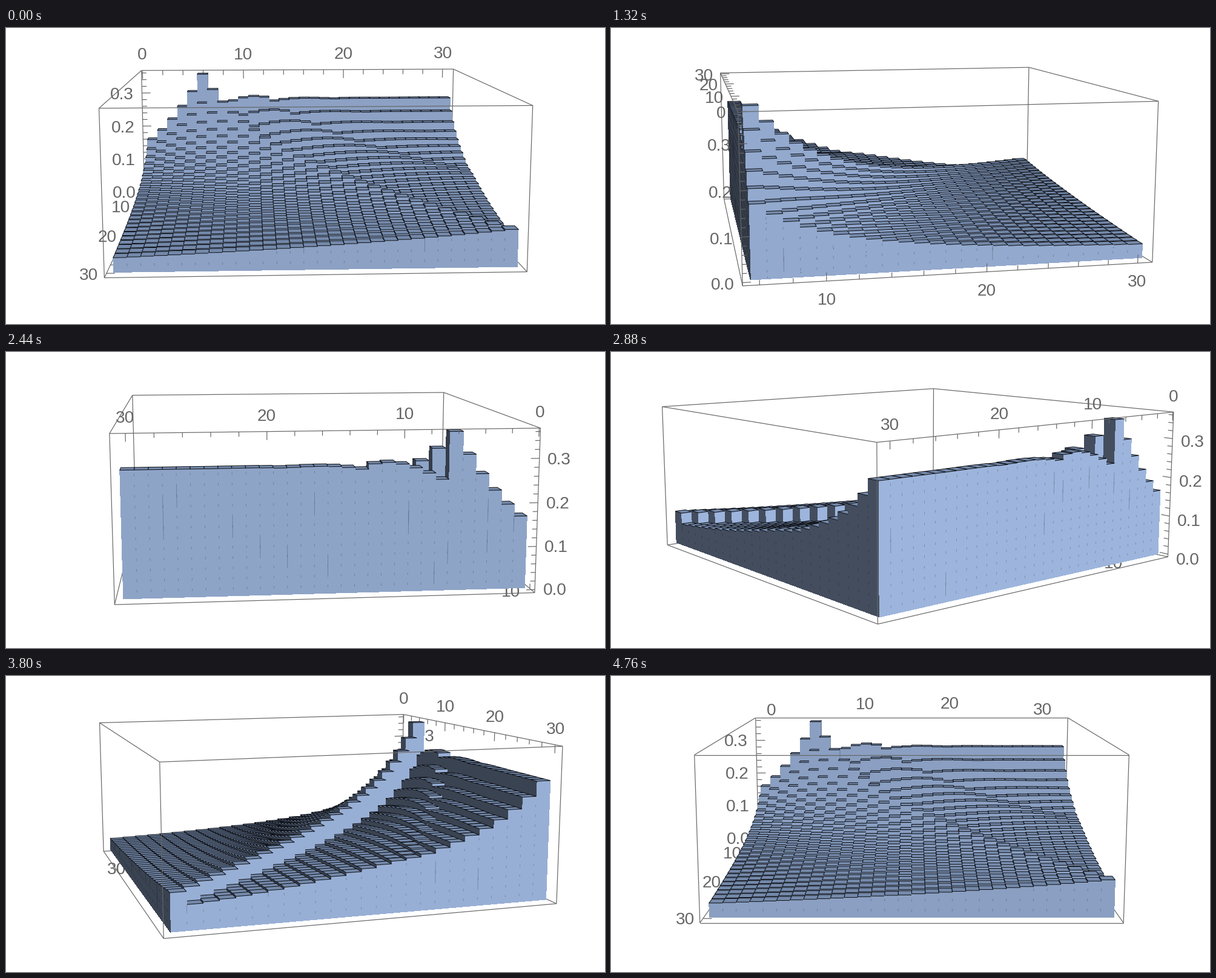
Animation of 989 by 490 pixels, one loop 4800 ms. Source, as a matplotlib script:

```python
from itertools import product

import matplotlib.pyplot as plt
import numpy as np
from matplotlib.animation import FuncAnimation
from matplotlib.collections import LineCollection, PolyCollection

W, H, DPI = 989, 490, 100
FRAMES, INTERVAL = 120, 40
PX = 72 / DPI
GREY = "#666666"

# Camera: the box spans +-1, +-1, +-0.4 and turns under a fixed eye.
DIST, FOCAL = np.sqrt(37), 1805
SIN, COS = 1 / np.sqrt(37), 6 / np.sqrt(37)
CX, CY = 496.5, 213.2
HALF = np.array([1, 1, 0.4])

# Brightness of an upright face by its angle to the viewer.
ANGLES = [-78, -72, -51, -36, -30, 0, 3, 12, 18, 39, 54, 60, 90]
BRIGHT = [53, 58, 67, 80, 92, 138, 140, 147, 152, 157, 151, 146, 120]
TOP = (116 / 255, 137 / 255, 170 / 255, 1)
EDGE = (0.05, 0.06, 0.08, 1)

SUMS = np.arange(1, 31)
SIDES = np.arange(6, 31)


def hit_chance(sides):
    """Chance that the running total of a fair die ever equals 1..30."""
    u = [1.0]
    for _ in SUMS:
        u.append(sum(u[-sides:]) / sides)
    return u[1:]


heights = np.array([hit_chance(s) for s in SIDES])
PEAK = heights.max()


def sx(v):
    return (v - 15.5) / 15.6


def sy(v):
    return (v - 18) / 13


def sz(v):
    return (v - PEAK / 2) * 0.4 / (0.52 * PEAK)


bar_x, bar_y = (g.ravel() for g in np.meshgrid(sx(SUMS), sy(SIDES)))
bar_z = sz(heights).ravel()
FLOOR = sz(0)
HX, HY = 0.5 / 15.6, 0.5 / 13


def project(p, th):
    p = np.asarray(p, float)
    x, y, z = p[..., 0], p[..., 1], p[..., 2]
    right = x * np.cos(th) + y * np.sin(th)
    near = y * np.cos(th) - x * np.sin(th)
    scale = FOCAL / (DIST - near * COS - z * SIN)
    return np.stack([CX + scale * right,
                     CY - scale * (z * COS - near * SIN)], axis=-1)


def shade(normal_x, normal_y, th):
    right = normal_x * np.cos(th) + normal_y * np.sin(th)
    near = normal_y * np.cos(th) - normal_x * np.sin(th)
    r = np.interp(np.degrees(np.arctan2(right, near)), ANGLES, BRIGHT)
    return np.stack([r, r * 1.15, r * 1.4, 0 * r + 255], axis=-1) / 255


def quad(*corners):
    return np.stack([np.stack(np.broadcast_arrays(*c), -1) for c in corners], 1)


def bar_faces(th, eye):
    """Visible faces of all bars from back to front, with their colours."""
    dx, dy = eye[0] - bar_x, eye[1] - bar_y
    fx, fy = np.sign(dx), np.sign(dy)
    x0, x1, y0, y1 = bar_x - HX, bar_x + HX, bar_y - HY, bar_y + HY
    px, py, z = bar_x + fx * HX, bar_y + fy * HY, bar_z
    quads = np.stack([
        quad((px, y0, FLOOR), (px, y1, FLOOR), (px, y1, z), (px, y0, z)),
        quad((x0, py, FLOOR), (x1, py, FLOOR), (x1, py, z), (x0, py, z)),
        quad((x0, y0, z), (x1, y0, z), (x1, y1, z), (x0, y1, z))], 1)
    tops = np.broadcast_to(TOP, (len(z), 4))
    colors = np.stack([shade(fx, 0 * fx, th), shade(0 * fy, fy, th), tops], 1)
    seen = np.stack([abs(dx) > HX, abs(dy) > HY, z > -1], 1)
    is_top = np.broadcast_to([False, False, True], seen.shape)
    order = np.argsort(-(abs(dx) + abs(dy)), kind="stable")
    keep = seen[order].ravel()
    pick = lambda a: a[order].reshape(-1, *a.shape[2:])[keep]
    return project(pick(quads), th), pick(colors), pick(is_top)


def seam_marks(th, vis, rng):
    """Dotted seams between bars on the outer walls, a few of them longer."""
    lines, colors = [], []
    top = sz(heights)
    for axis, s in product((0, 1), (-1, 1)):
        if not vis[axis, s]:
            continue
        end = 0 if s < 0 else -1
        wall = top[:, end] if axis == 0 else top[end]
        places = sy(SIDES + 0.5) if axis == 0 else sx(SUMS + 0.5)
        normal = (s, 0) if axis == 0 else (0, s)
        tint = shade(*np.array(normal, float), th) * [0.6, 0.6, 0.6, 0.6]
        plane = s * 15 / 15.6 if axis == 0 else s * 12.5 / 13
        for i in range(len(wall) - 1):
            at = (plane, places[i]) if axis == 0 else (places[i], plane)
            ceiling = min(wall[i], wall[i + 1])
            for z0 in np.arange(FLOOR + 0.03, ceiling - 0.02, 0.05):
                size = 0.1 if rng.rand() < 0.04 else 0.012
                z1 = min(z0 + size, ceiling)
                lines.append(project([(*at, z0), (*at, z1)], th))
                colors.append(tint)
    return lines, colors


def box_edges(th, vis):
    back, front = [], []
    for axis in range(3):
        others = [i for i in range(3) if i != axis]
        for signs in product((-1, 1), repeat=2):
            ends = np.zeros((2, 3))
            ends[:, axis] = -1, 1
            ends[:, others] = signs
            near = any(vis[o, s] for o, s in zip(others, signs))
            (front if near else back).append(project(ends * HALF, th))
    return back, front


def screen_dir(p, d, th):
    p = np.asarray(p, float)
    v = project(p + 0.01 * np.asarray(d), th) - project(p, th)
    return v / np.hypot(*v)


def across(start, end, options, th):
    """The option most square to the edge on screen."""
    mid = (np.array(start) + end) / 2
    along = screen_dir(mid, np.subtract(end, start), th)

    def squareness(d):
        v = screen_dir(mid, d, th)
        return abs(along[0] * v[1] - along[1] * v[0])
    return max(options, key=squareness)


def upright_side(th):
    def score(d):
        right = d[0] * np.cos(th) + d[1] * np.sin(th)
        near = d[1] * np.cos(th) - d[0] * np.sin(th)
        return abs(right) + 0.5 * max(near, 0)
    return max([(-1, 0, 0), (0, -1, 0)], key=score)


fig = plt.figure(figsize=(W / DPI, H / DPI), dpi=DPI, facecolor="white")
ax = fig.add_axes([0, 0, 1, 1])
ax.set_xlim(0, W)
ax.set_ylim(H, 0)
ax.axis("off")

back_lines = LineCollection([], colors=GREY, linewidths=1.2 * PX, zorder=1)
bars = PolyCollection([], zorder=2)
seams = LineCollection([], linewidths=0.9 * PX, zorder=3)
front_lines = LineCollection([], colors=GREY, linewidths=1.2 * PX, zorder=4)
for artist in (back_lines, bars, seams, front_lines):
    ax.add_collection(artist, autolim=False)


def make_labels(texts):
    return [ax.text(0, 0, t, family="Liberation Sans", fontsize=28 * PX,
                    color=GREY, ha="center", va="baseline") for t in texts]


# Each axis: tick values, ticks per label, first labelled tick, point, labels.
sum_axis = (np.arange(0, 31, 2), 5, 0, lambda v: (sx(v), -1, 0.4),
            make_labels(["0", "10", "20", "30"]))
side_axis = (np.arange(6, 31, 2), 5, 2, lambda v: (-1, sy(v), -0.4),
             make_labels(["10", "20", "30"]))
value_axis = (np.arange(19) * 0.02, 5, 0, lambda v: (-1, -1, sz(v)),
              make_labels(["0.0", "0.1", "0.2", "0.3"]))


def place_axis(axis, out, gap, in_front, th, ticks=True):
    """Move the labels and return the tick lines."""
    values, step, first, point, labels = axis
    lines = []
    for i, v in enumerate(values):
        p = point(v)
        at, d = project(p, th), screen_dir(p, out, th)
        major = i % step == first
        if ticks:
            lines.append([at, at - d * (14 if major else 8)])
        if major:
            label = labels[i // step]
            x, y = at + d * gap
            label.set_position((x, y + 10))
            label.set_zorder(5 if in_front else 1)
    return lines


def draw(n):
    th = np.radians(3 * (n + 1))
    eye = DIST * COS * np.array([-np.sin(th), np.cos(th)])
    vis = {(a, s): s * eye[a] > 1 for a in (0, 1) for s in (-1, 1)}
    vis[2, 1], vis[2, -1] = True, False

    quads, colors, is_top = bar_faces(th, eye)
    bars.set_verts(quads)
    bars.set_facecolor(colors)
    bars.set_edgecolor(np.where(is_top[:, None], EDGE, (0, 0, 0, 0)))
    bars.set_linewidth(np.where(is_top, PX, 0))
    bars.set_antialiased(is_top.tolist())

    lines, tints = seam_marks(th, vis, np.random.RandomState(n))
    seams.set_segments(lines)
    seams.set_color(tints)

    back, front = box_edges(th, vis)
    square_on = np.cos(th) > 0.9999
    sum_out = (0, -1, 0) if square_on else across(
        (-1, -1, 0.4), (1, -1, 0.4), [(0, 0, 1), (0, -1, 0)], th)
    side_out = across((-1, -1, -0.4), (-1, 1, -0.4),
                      [(0, 0, -1), (-1, 0, 0)], th)
    for axis, out, gap, near, ticks in (
            (sum_axis, sum_out, 28, vis[1, -1], not square_on),
            (side_axis, side_out, 29, vis[0, -1], True),
            (value_axis, upright_side(th), 33, vis[0, -1] or vis[1, -1], True)):
        target = front if near else back
        target.extend(place_axis(axis, out, gap, near, th, ticks))
    back_lines.set_segments(back)
    front_lines.set_segments(front)
    return []


anim = FuncAnimation(fig, draw, frames=FRAMES, interval=INTERVAL, repeat=True)
plt.show()
```
